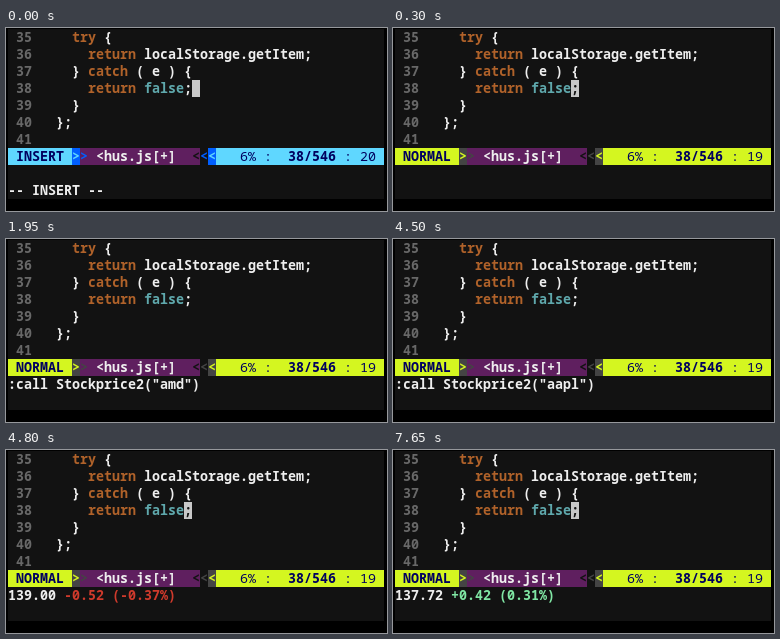
An HTML page with a canvas that plays this animation: 381x183 px, repeating every 8 s.

```html
<!DOCTYPE html>
<html>
<head>
<meta charset="utf-8">
<style>
html, body { margin: 0; width: 381px; height: 183px; overflow: hidden; background: #000; }
canvas { display: block; }
</style>
</head>
<body>
<canvas id="stage" width="381" height="183"></canvas>
<script>
const ctx = document.getElementById('stage').getContext('2d');
const CELL = 8, LINE = 17, LEFT = 2, TOP = 1, COLS = 47, ROWS = 10;
const WHITE = '#eeeeee', ORANGE = '#b0622a', TEAL = '#5fa8ac', GRAY = '#686868';
const GREEN = '#80e6a4', RED = '#cf3a2c', PAPER = '#121212', PURPLE = '#5f1f5f';

const MODES = {
  INSERT: { main: '#5fd7ff', side: '#005fff', column: 20 },
  NORMAL: { main: '#d4f620', side: '#444444', column: 19 }
};

function fill(col, row, cols, color, rows = 1) {
  ctx.fillStyle = color;
  ctx.fillRect(LEFT + col * CELL, TOP + row * LINE, cols * CELL, rows * LINE);
}

function text(col, row, str, color, weight = 600) {
  ctx.font = weight + ' 13.33px "Noto Sans Mono", "DejaVu Sans Mono", monospace';
  ctx.fillStyle = color;
  [...str].forEach((ch, i) => ctx.fillText(ch, LEFT + (col + i) * CELL, TOP + row * LINE + 13));
}

function drawCode() {
  for (let i = 0; i < 7; i++) text(1, i, String(35 + i), GRAY);
  text(8, 0, 'try', ORANGE);
  text(12, 0, '{', WHITE);
  text(10, 1, 'return', ORANGE);
  text(17, 1, 'localStorage.getItem;', WHITE);
  text(8, 2, '}', WHITE);
  text(10, 2, 'catch', ORANGE);
  text(16, 2, '( e ) {', WHITE);
  text(10, 3, 'return', ORANGE);
  text(17, 3, 'false', TEAL);
  text(22, 3, ';', WHITE);
  text(8, 4, '}', WHITE);
  text(6, 5, '};', WHITE);
}

function drawStatus(mode) {
  const { main, side, column } = MODES[mode];
  const ink = '#00005f';
  fill(0, 7, COLS, main);
  fill(8, 7, 1, side);
  fill(9, 7, 15, PURPLE);
  fill(24, 7, 1, PAPER);
  fill(25, 7, 1, side);
  text(1, 7, mode, ink);
  text(8, 7, '>', main);
  text(9, 7, '>', side);
  text(11, 7, '<hus.js[+]', WHITE);
  text(23, 7, '<', PAPER);
  text(24, 7, '<', side);
  text(25, 7, '<', main);
  text(29, 7, '6% :', ink, 500);
  text(35, 7, '38/546', ink);
  text(42, 7, ': ' + column, ink, 500);
}

function drawCursor(col) {
  fill(col, 3, 1, '#c8c8c8');
  if (col === 22) text(col, 3, ';', PAPER);
}

const command = ticker => () => text(0, 8, `:call Stockprice2("${ticker}")`, WHITE);

const quote = (price, change, color) => () => {
  text(0, 8, price, WHITE);
  text(price.length + 1, 8, change, color);
  drawCursor(22);
};

const insertLine = () => text(0, 9, '-- INSERT --', WHITE);

// Start time in ms, mode, extra drawing
const steps = [
  [0, 'INSERT', () => { insertLine(); drawCursor(23); }],
  [150, 'INSERT', insertLine],
  [300, 'NORMAL', () => drawCursor(22)],
  [1950, 'NORMAL', command('amd')],
  [2700, 'NORMAL', quote('4.10', '+0.03 (0.74%)', GREEN)],
  [4500, 'NORMAL', command('aapl')],
  [4800, 'NORMAL', quote('139.00', '-0.52 (-0.37%)', RED)],
  [6750, 'NORMAL', command('fb')],
  [7650, 'NORMAL', quote('137.72', '+0.42 (0.31%)', GREEN)]
];

function frame() {
  const t = performance.now() % 8000;
  const [, mode, extra] = steps.findLast(s => s[0] <= t);
  ctx.fillStyle = '#000';
  ctx.fillRect(0, 0, 381, 183);
  fill(0, 0, COLS, PAPER, ROWS);
  drawCode();
  drawStatus(mode);
  extra();
  requestAnimationFrame(frame);
}
frame();
</script>
</body>
</html>
```
